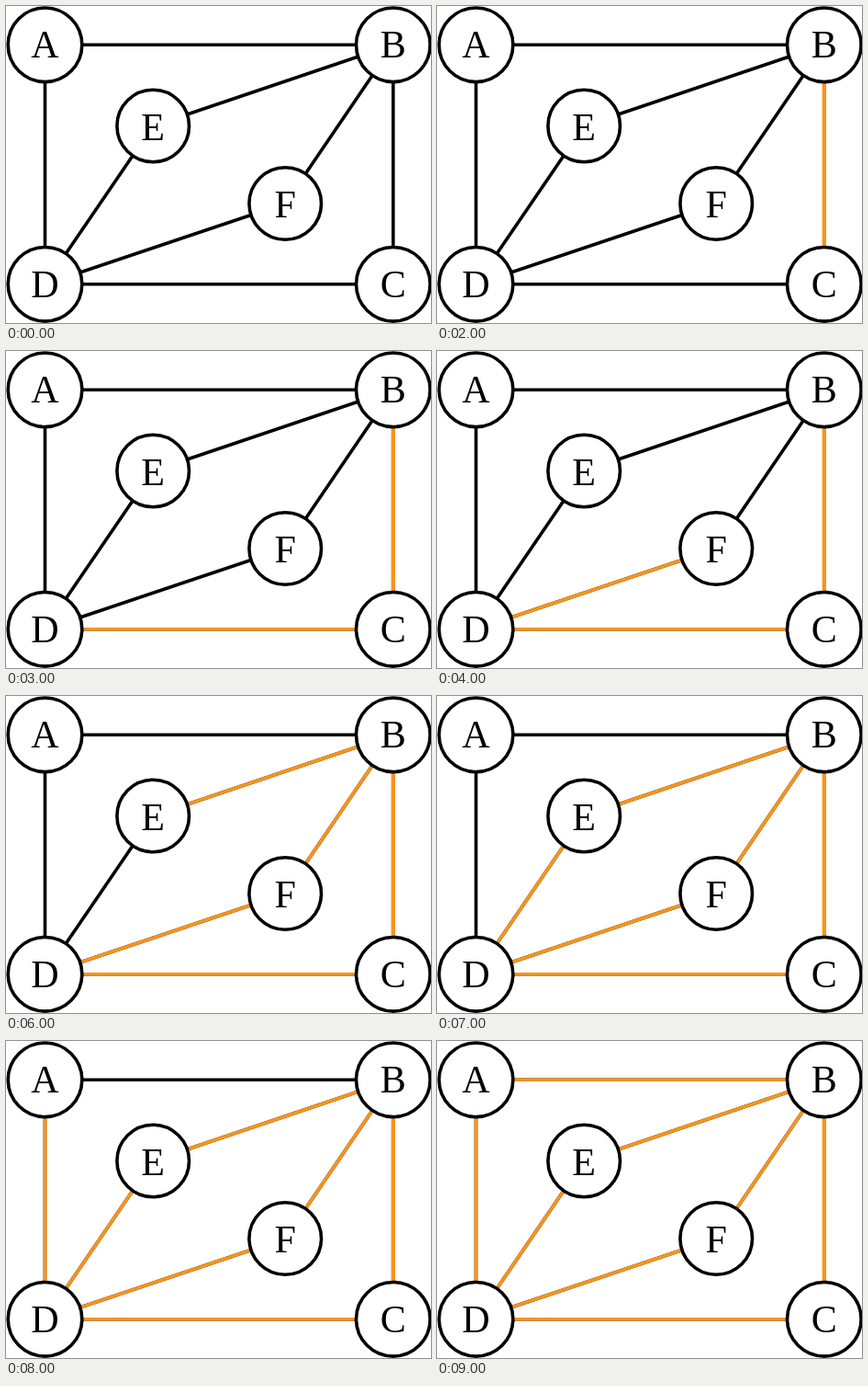
Write an HTML page that moves like this. It is 463 px wide and 345 px high and loops after 10000 ms.

```html
<!DOCTYPE html>
<html lang="en">
<head>
<meta charset="utf-8">
<title>Graph edge traversal</title>
<style>
  html, body { margin: 0; width: 100%; height: 100%; overflow: hidden; background: #fff; }
  svg { display: block; width: 463px; height: 345px; }
  line { stroke: #000; stroke-width: 3.6; }
  .visited { stroke: #f7941d; }
  circle { fill: #fff; stroke: #000; stroke-width: 3.6; }
  text { font: 42px "Liberation Serif", "Times New Roman", serif; text-anchor: middle; }
</style>
</head>
<body>
<svg viewBox="0 0 463 345"></svg>
<script>
const LOOP = 10000, FIRST = 2000, STEP = 1000;

// name: [x, y, radius, text baseline]
const nodes = {
  A: [42.5, 42.3, 40.3, 56],
  B: [421.8, 42.3, 40.3, 56],
  C: [421.8, 302.8, 40.3, 317],
  D: [42.5, 302.8, 40.3, 317],
  E: [160.2, 130.5, 39.3, 146],
  F: [304.2, 215, 39.3, 230]
};
// In the order they are visited
const edges = ["BC", "CD", "DF", "FB", "BE", "ED", "DA", "AB"];

const svg = document.querySelector("svg");

function add(tag, attrs, text = "") {
  const el = document.createElementNS("http://www.w3.org/2000/svg", tag);
  for (const key in attrs) el.setAttribute(key, attrs[key]);
  el.textContent = text;
  return svg.appendChild(el);
}

function addEdge([from, to], attrs) {
  const [x1, y1] = nodes[from], [x2, y2] = nodes[to];
  return add("line", { x1, y1, x2, y2, ...attrs });
}

edges.forEach(edge => addEdge(edge));
const marks = edges.map(edge => addEdge(edge, { class: "visited" }));
marks[0].style.strokeWidth = 4.4;

for (const name in nodes) {
  const [cx, cy, r, y] = nodes[name];
  add("circle", { cx, cy, r });
  add("text", { x: cx, y }, name);
}

const start = performance.now();

function draw() {
  const t = (performance.now() - start) % LOOP;
  marks.forEach((mark, i) => {
    mark.style.visibility = t >= FIRST + i * STEP ? "visible" : "hidden";
  });
  requestAnimationFrame(draw);
}
draw();
</script>
</body>
</html>
```
